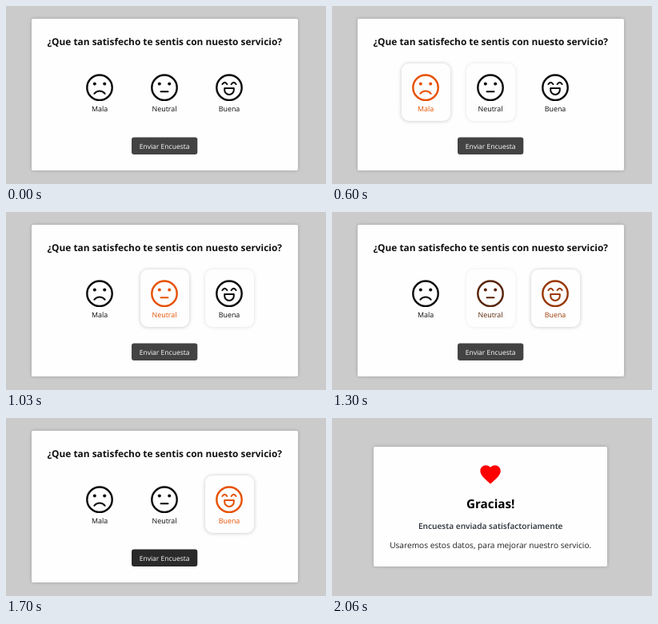
An HTML page that plays this animation: 400x223 px, repeating every 2600 ms.

```html
<!DOCTYPE html>
<html lang="es">
<head>
<meta charset="utf-8">
<title>Encuesta</title>
<style>
  html, body { margin: 0; width: 100%; height: 100%; overflow: hidden; background: #cbcbcb; }
  .stage { position: relative; width: 400px; height: 223px; overflow: hidden; }
  .screen { position: absolute; inset: 0; }
  .panel, .tile { position: absolute; background: #fefefe; }
  .panel { border-radius: 2px; box-shadow: 0 0 4px rgba(0, 0, 0, .22); }
  #survey .panel { left: 31.5px; top: 15.6px; width: 333px; height: 190.6px; }
  #thanks .panel { left: 51.7px; top: 36px; width: 292.3px; height: 150px; }
  #thanks { opacity: 0; }
  .tile {
    top: 71.7px; width: 61px; height: 72.3px; border-radius: 9px;
    box-shadow: 0 .3px 5px rgba(0, 0, 0, .22); opacity: 0;
  }
  svg { position: absolute; inset: 0; }
  text {
    font-family: "Open Sans", "Noto Sans", sans-serif; text-anchor: middle;
    text-rendering: geometricPrecision; fill: #111;
  }
  .face { color: #0a0a0a; }
  .face text { font-size: 8.89px; fill: currentColor; }
  .line { fill: none; stroke: currentColor; stroke-width: 2.4; stroke-linecap: round; stroke-linejoin: round; }
  .fine { stroke-width: 2; }
  .dot { fill: currentColor; }
  #send { fill: #434343; }
</style>
</head>
<body>
<div class="stage">
  <div class="screen" id="survey">
    <div class="panel"></div>
    <div class="tile" style="left:86.5px"></div>
    <div class="tile" style="left:167.5px"></div>
    <div class="tile" style="left:248.5px"></div>
    <svg width="400" height="223">
      <text x="198.2" y="49" font-size="11.88" font-weight="700">¿Que tan satisfecho te sentis con nuesto servicio?</text>
      <g class="face" transform="translate(117 102.2)">
        <circle class="line" r="15.7"/>
        <circle class="dot" cx="-6.2" cy="-4.6" r="2"/>
        <circle class="dot" cx="6.2" cy="-4.6" r="2"/>
        <path class="line fine" d="M-6.7 7.6Q-4 4.2 0 4.2T6.7 7.6"/>
        <text y="29.9">Mala</text>
      </g>
      <g class="face" transform="translate(198 102.2)">
        <circle class="line" r="15.7"/>
        <circle class="dot" cx="-6.2" cy="-4.6" r="2"/>
        <circle class="dot" cx="6.2" cy="-4.6" r="2"/>
        <path class="line fine" d="M-4.5 5H4.5"/>
        <text y="29.9">Neutral</text>
      </g>
      <g class="face" transform="translate(279 102.2)">
        <circle class="line" r="15.7"/>
        <path class="line fine" d="M-8.6 -4.2Q-5.6 -8.8 -2.6 -4.2M2.6 -4.2Q5.6 -8.8 8.6 -4.2"/>
        <path class="line fine" d="M-5.8 .8H5.8V3A5.8 5.8 0 0 1 -5.8 3Z"/>
        <text y="29.9">Buena</text>
      </g>
      <rect id="send" x="157" y="164.6" width="82.3" height="21.3" rx="3"/>
      <text x="198.1" y="178.9" font-size="8.55" style="fill:#fff">Enviar Encuesta</text>
    </svg>
  </div>
  <div class="screen" id="thanks">
    <div class="panel"></div>
    <svg width="400" height="223">
      <path fill="#f00" transform="translate(182.8 55.5) scale(1.27)"
        d="M12 21.35l-1.45-1.32C5.4 15.36 2 12.28 2 8.5 2 5.42 4.42 3 7.5 3c1.74 0 3.41.81 4.5 2.09C13.09 3.81 14.76 3 16.5 3 19.58 3 22 5.42 22 8.5c0 3.78-3.4 6.86-8.55 11.54z"/>
      <text x="198.2" y="113.3" font-size="15.24" font-weight="700" style="fill:#000">Gracias!</text>
      <text x="198.2" y="138.5" font-size="10.16" font-weight="600" style="fill:#2a2f3a">Encuesta enviada satisfactoriamente</text>
      <text x="198.2" y="162.8" font-size="10.16" style="fill:#222">Usaremos estos datos, para mejorar nuestro servicio.</text>
    </svg>
  </div>
</div>
<script>
  const LOOP = 2600, SWITCH = 2060, FADE = 400;
  const INK = '#0a0a0a', ACCENT = '#e65100';

  // Each step is [start ms, new value, fade ms]; a fade of 0 is a hard change.
  function run(el, prop, first, steps) {
    const frames = [{ offset: 0, [prop]: first }];
    let value = first;
    for (const [start, next, fade] of steps) {
      frames.push({ offset: start / LOOP, [prop]: value, easing: 'ease' });
      frames.push({ offset: (start + fade) / LOOP, [prop]: next });
      value = next;
    }
    frames.push({ offset: 1, [prop]: value });
    el.animate(frames, { duration: LOOP, iterations: Infinity });
  }

  const all = s => [...document.querySelectorAll(s)];
  const tiles = all('.tile'), faces = all('.face');

  // Pointer enters, option is chosen, next option takes over.
  const choices = [
    { hover: 60, pick: 150, drop: 640 },
    { hover: 480, pick: 640, drop: 1150 },
    { hover: 900, pick: 1150 }
  ];
  choices.forEach(({ hover, pick, drop }, i) => {
    const glow = [[hover, 1, FADE]], tint = [[pick, ACCENT, FADE]];
    if (drop) {
      glow.push([drop, 0, FADE]);
      tint.push([drop, INK, FADE]);
    }
    run(tiles[i], 'opacity', 0, glow);
    run(faces[i], 'color', INK, tint);
  });

  run(document.getElementById('send'), 'fill', '#434343', [[1630, '#000000', 300]]);
  run(document.getElementById('survey'), 'opacity', 1, [[SWITCH, 0, 0]]);
  run(document.getElementById('thanks'), 'opacity', 0, [[SWITCH, 1, 0]]);
</script>
</body>
</html>
```
